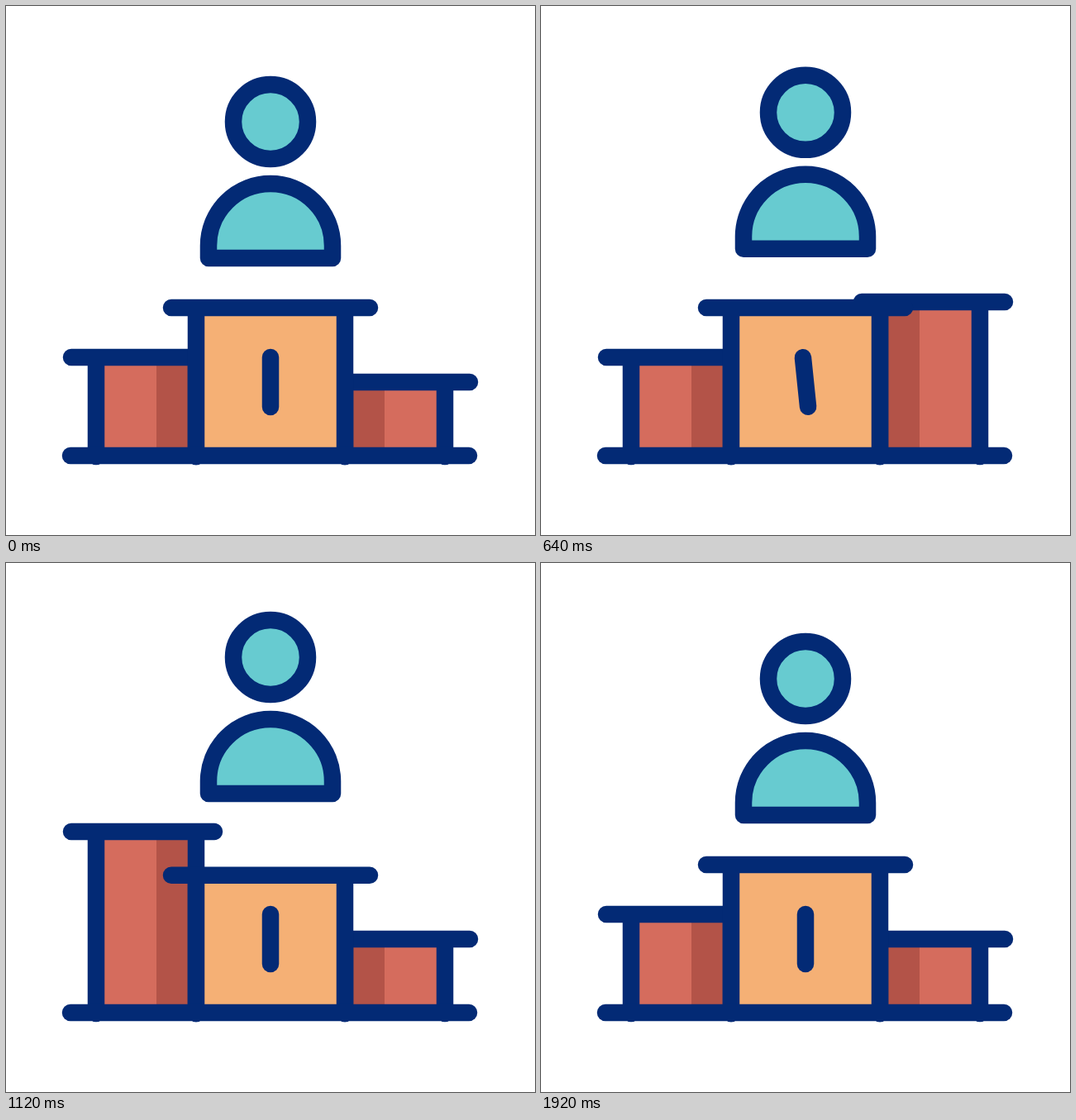
Recreate the animation shown at these times as an HTML page. Size 640x640 px, loop 2 s.

```html
<!DOCTYPE html>
<html lang="en">
<head>
<meta charset="utf-8">
<title>Podium</title>
<style>
  html, body { margin: 0; width: 100%; height: 100%; overflow: hidden; background: #fff; }
  svg { display: block; width: 100%; height: 100%; }
  .line { fill: none; stroke: #032a75; stroke-width: 20.5; stroke-linecap: round; stroke-linejoin: round; }
  #person .line { fill: #67cbd0; }
  .red { fill: #d56c5d; }
  .dark { fill: #b35348; }
  .gold { fill: #f5b075; }
</style>
</head>
<body>
<svg viewBox="0 0 640 640">
  <g id="left"><path class="red"/><path class="dark"/><path class="line"/></g>
  <g id="right" transform="matrix(-1 0 0 1 640 0)"><path class="red"/><path class="dark"/><path class="line"/></g>
  <g id="centre"><path class="gold"/><path class="line"/></g>
  <path class="line" d="M78 544H560"/>
  <path id="mark" class="line" d="M320 425V485"/>
  <g id="person">
    <circle class="line" cx="320" cy="140" r="45"/>
    <path class="line" d="M245 305V290A75 75 0 0 1 395 290V305Z"/>
  </g>
</svg>
<script>
const LOOP = 2000, STEP = 40, FLOOR = 545;
const BEAT = 165, LIFT = 100, LAUNCH = 740;

const $ = id => document.getElementById(id);

// Share of an eased move that is done at time t.
function ease(t, start, length) {
  const p = Math.min(1, Math.max(0, (t - start) / length));
  return p * p * (3 - 2 * p);
}

// Shoot up, drop below rest by dip, settle: one beat each.
function pop(t, start, dip) {
  return -LIFT * ease(t, start, BEAT)
    + (LIFT + dip) * ease(t, start + BEAT, BEAT)
    - dip * ease(t, start + 2 * BEAT, BEAT);
}

// Step down, jump, land, get launched by the centre block, float back.
function personShift(t) {
  return 40 * ease(t, 133, 207)
    - 85 * ease(t, 357, 207)
    + 85 * ease(t, 564, LAUNCH - 564)
    - LIFT * ease(t, LAUNCH, BEAT)
    + 60 * ease(t, LAUNCH + BEAT, 395);
}

const markTurn = t => 180 * (ease(t, 402, 267) + ease(t, 1633, 267));

const fill = (x1, x2, y) => `M${x1} ${y}H${x2}V${FLOOR}H${x1}Z`;
const frame = (x1, x2, post1, post2, y) =>
  `M${x1} ${y}H${x2}M${post1} ${y}V${FLOOR}M${post2} ${y}V${FLOOR}`;

function setPaths(id, ...shapes) {
  shapes.forEach((d, i) => $(id).children[i].setAttribute("d", d));
}

function drawSide(id, y) {
  setPaths(id, fill(109, 230, y), fill(182, 230, y), frame(79, 252, 109, 230, y));
}

function drawCentre(y) {
  setPaths("centre", fill(230, 410, y), frame(200, 440, 230, 410, y));
}

function draw(t) {
  drawSide("right", 455 + pop(t, 459, 16.5));
  drawCentre(365 + pop(t, LAUNCH, 16.5));
  drawSide("left", 425 + pop(t, 955, 22));
  $("person").setAttribute("transform", `translate(0 ${personShift(t)})`);
  $("mark").setAttribute("transform", `rotate(${markTurn(t)} 320 455)`);
}

const start = performance.now();
function tick() {
  const t = (performance.now() - start) % LOOP;
  draw(Math.floor(t / STEP) * STEP);
  requestAnimationFrame(tick);
}
tick();
</script>
</body>
</html>
```
